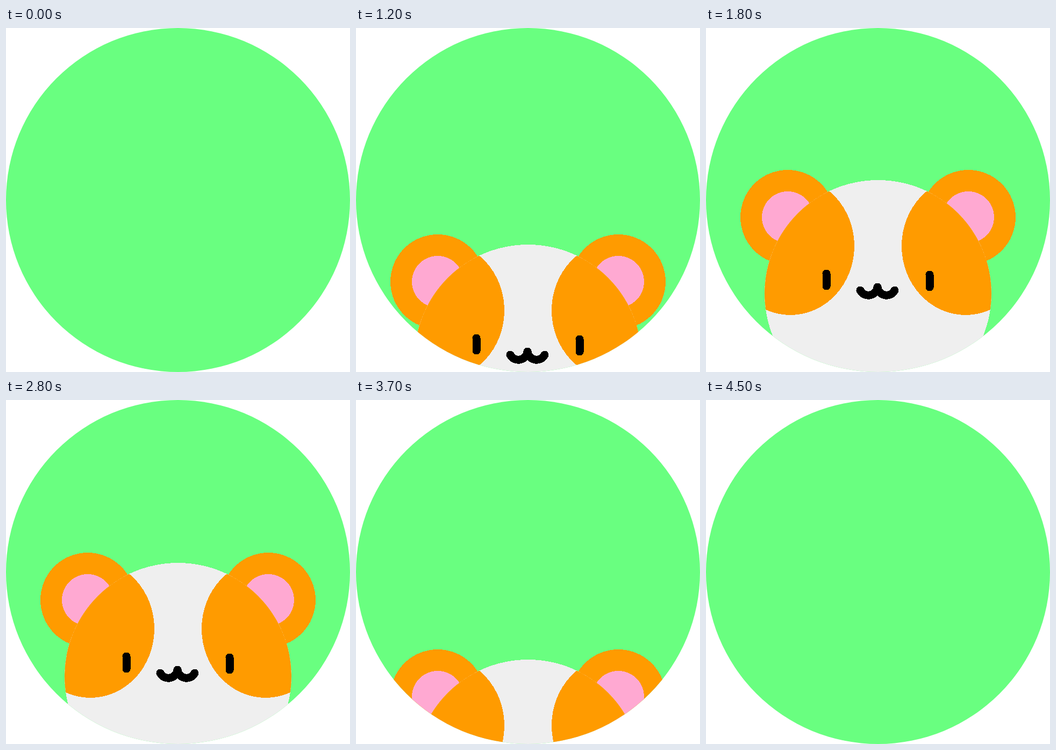
An HTML page that plays this animation: 640 by 640 pixels, repeating every 4.6 s.

```html
<!DOCTYPE html>
<html lang="en">
<head>
<meta charset="utf-8">
<title>Peeking hamster</title>
<style>
  html, body { margin: 0; width: 100%; height: 100%; overflow: hidden; background: #fff; }
  svg { display: block; width: 100%; height: 100%; shape-rendering: crispEdges; }
</style>
</head>
<body>
<svg viewBox="0 0 640 640">
  <defs>
    <clipPath id="stage"><circle cx="320" cy="320" r="320"/></clipPath>
    <clipPath id="head"><circle cx="320" cy="494" r="211"/></clipPath>
    <g id="ear">
      <circle cx="152" cy="352" r="88" fill="#ff9b00"/>
      <circle cx="152" cy="352" r="48" fill="#ffa9d2"/>
    </g>
    <ellipse id="patch" cx="157" cy="405.5" rx="119" ry="128.5" fill="#ff9b00"/>
  </defs>
  <g clip-path="url(#stage)">
    <rect width="640" height="640" fill="#69ff80"/>
    <g id="hamster">
      <use href="#ear"/>
      <use href="#ear" transform="matrix(-1 0 0 1 640 0)"/>
      <circle cx="320" cy="494" r="211" fill="#efefef"/>
      <g clip-path="url(#head)">
        <use href="#patch"/>
        <use href="#patch" transform="matrix(-1 0 0 1 640 0)"/>
      </g>
      <rect x="216.5" y="450" width="15" height="37" rx="6.5"/>
      <rect x="408.5" y="452" width="15" height="37" rx="6.5"/>
      <path d="M287 488A17 17 0 0 0 319 482A17 17 0 0 0 351 488" fill="none"
        stroke="#000" stroke-width="15" stroke-linecap="round" stroke-linejoin="round"/>
    </g>
  </g>
</svg>
<script>
  const LOOP = 4600, TICK = 100, STEP = 20;
  const RISE_TICKS = 18, SINK_START = 27;
  const hamster = document.getElementById('hamster');
  const start = performance.now();

  function draw(now) {
    const tick = Math.floor((Math.max(0, now - start) % LOOP) / TICK);
    // Rises in even steps, rests at the top, then sinks the same way.
    const drop = STEP * Math.max(0, RISE_TICKS - tick, tick - SINK_START);
    hamster.setAttribute('transform', `translate(0 ${drop})`);
    requestAnimationFrame(draw);
  }
  draw(start);
</script>
</body>
</html>
```
